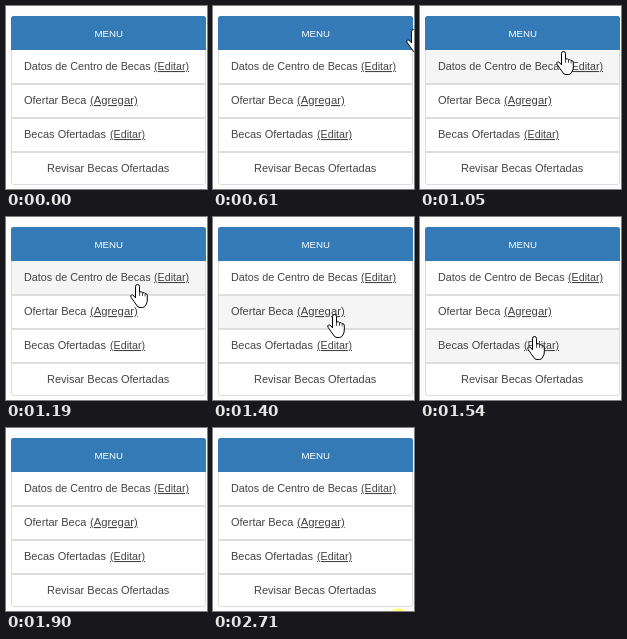
Write an HTML page that moves like this. It is 201 px wide and 183 px high and loops after 2.82 s.

```html
<!DOCTYPE html>
<html lang="es">
<head>
<meta charset="utf-8">
<title>Menu</title>
<style>
  html, body { margin: 0; width: 100%; height: 100%; overflow: hidden; background: #fdfdfd; }
  svg { display: block; width: 201px; height: 183px; }
  text { font: 11px "Liberation Sans", Arial, sans-serif; fill: #444; }
  .title { font-size: 9.7px; fill: #fff; }
  .long { font-size: 10.8px; }
  .link { font-size: 10.7px; text-decoration: underline; }
  .wide { font-size: 11.3px; }
</style>
</head>
<body>
<svg viewBox="0 0 201 183">
  <rect x="5.5" y="10.5" width="194" height="168" rx="2.5" fill="#fff"/>
  <g id="rows"></g>
  <path d="M5.5 44V176a2.5 2.5 0 0 0 2.5 2.5H197a2.5 2.5 0 0 0 2.5-2.5V44" fill="none" stroke="#ddd"/>
  <path d="M5 78H200M5 112H200M5 146H200" stroke="#ddd" stroke-width="2"/>
  <path d="M5 44V12.500a2.500 2.500 0 0 1 2.500-2.500H197.500a2.500 2.500 0 0 1 2.500 2.500V44Z" fill="#337ab7"/>
  <text class="title" x="88.500" y="31">MENU</text>
  <text class="long" x="18" y="64">Datos de Centro de Becas</text>
  <text class="link" x="148" y="64">(Editar)</text>
  <text x="18" y="98">Ofertar Beca</text>
  <text class="link wide" x="84" y="98">(Agregar)</text>
  <text x="18" y="132">Becas Ofertadas</text>
  <text class="link" x="104" y="132">(Editar)</text>
  <text x="41" y="166">Revisar Becas Ofertadas</text>
  <circle id="glow" cx="185.5" cy="189" r="9" fill="#ffff80"/>
  <g id="hand" stroke="#000" stroke-linecap="round" stroke-linejoin="round">
    <path d="M5.5 13.5V2.5a2 2 0 0 1 4 0V8q2.4-.8 3 .8q2.1-.6 2.600 .8q2.200-.2 2.200 1.900V16q0 3-1.500 5q-1 2.500-3.300 2.500H10q-2.500 0-3.500-2.500L4 17.500L1.200 13.500Q0 11.500 1.500 11q1.300-.4 2.300 .8Z" fill="#fff"/>
    <path d="M9.500 8V11.500M12.500 9V11.500M15.100 10V12" fill="none" stroke-width=".7"/>
  </g>
</svg>
<script>
const LOOP = 2820, ENTER = 610, LEAVE = 1900;
const ROW_EDGES = [44, 77, 111, 145, 178];
// time, left, top of the pointer
const PATH = [
  [610, 193, 23], [870, 153, 27], [1130, 128, 56], [1188, 124, 67],
  [1391, 114, 97], [1680, 100, 142], [1900, 91, 183]
];
const NS = "http://www.w3.org/2000/svg";
const byId = id => document.getElementById(id);
const hand = byId("hand"), glow = byId("glow");

const rows = ROW_EDGES.slice(1).map((end, i) => {
  const row = document.createElementNS(NS, "rect");
  const attrs = { x: 6, y: ROW_EDGES[i], width: 193, height: end - ROW_EDGES[i], fill: "#f5f5f5" };
  for (const name in attrs) row.setAttribute(name, attrs[name]);
  byId("rows").append(row);
  return row;
});

const show = (el, on) => el.setAttribute("visibility", on ? "visible" : "hidden");

function slope(i, axis) {
  const a = PATH[Math.max(i - 1, 0)], b = PATH[Math.min(i + 1, PATH.length - 1)];
  return (b[axis] - a[axis]) / (b[0] - a[0]);
}

function pointAt(t, axis) {
  let i = 0;
  while (i < PATH.length - 2 && t >= PATH[i + 1][0]) i++;
  const a = PATH[i], b = PATH[i + 1], span = b[0] - a[0];
  const u = Math.min(1, Math.max(0, (t - a[0]) / span)), v = 1 - u;
  return Math.round(
    v * v * (1 + 2 * u) * a[axis] + u * u * (3 - 2 * u) * b[axis] +
    span * u * v * (v * slope(i, axis) - u * slope(i + 1, axis))
  );
}

// The pointer is sampled in short, even ticks
function tick(t) {
  const [start, step] = t < 1700 ? [ENTER, 28.92] : [1700, 25];
  return start + Math.floor((t - start) / step + 0.05) * step;
}

function draw(t) {
  const active = t >= ENTER && t < LEAVE;
  const time = tick(t), x = pointAt(time, 1), y = pointAt(time, 2);
  hand.setAttribute("transform", `translate(${x} ${y})`);
  show(hand, active);
  rows.forEach((row, i) => show(row, active && y + 1 >= ROW_EDGES[i] && y + 1 < ROW_EDGES[i + 1]));
  show(glow, t >= 2710);
}

const begin = performance.now();
function frame() {
  draw((performance.now() - begin) % LOOP);
  requestAnimationFrame(frame);
}
frame();
</script>
</body>
</html>
```
